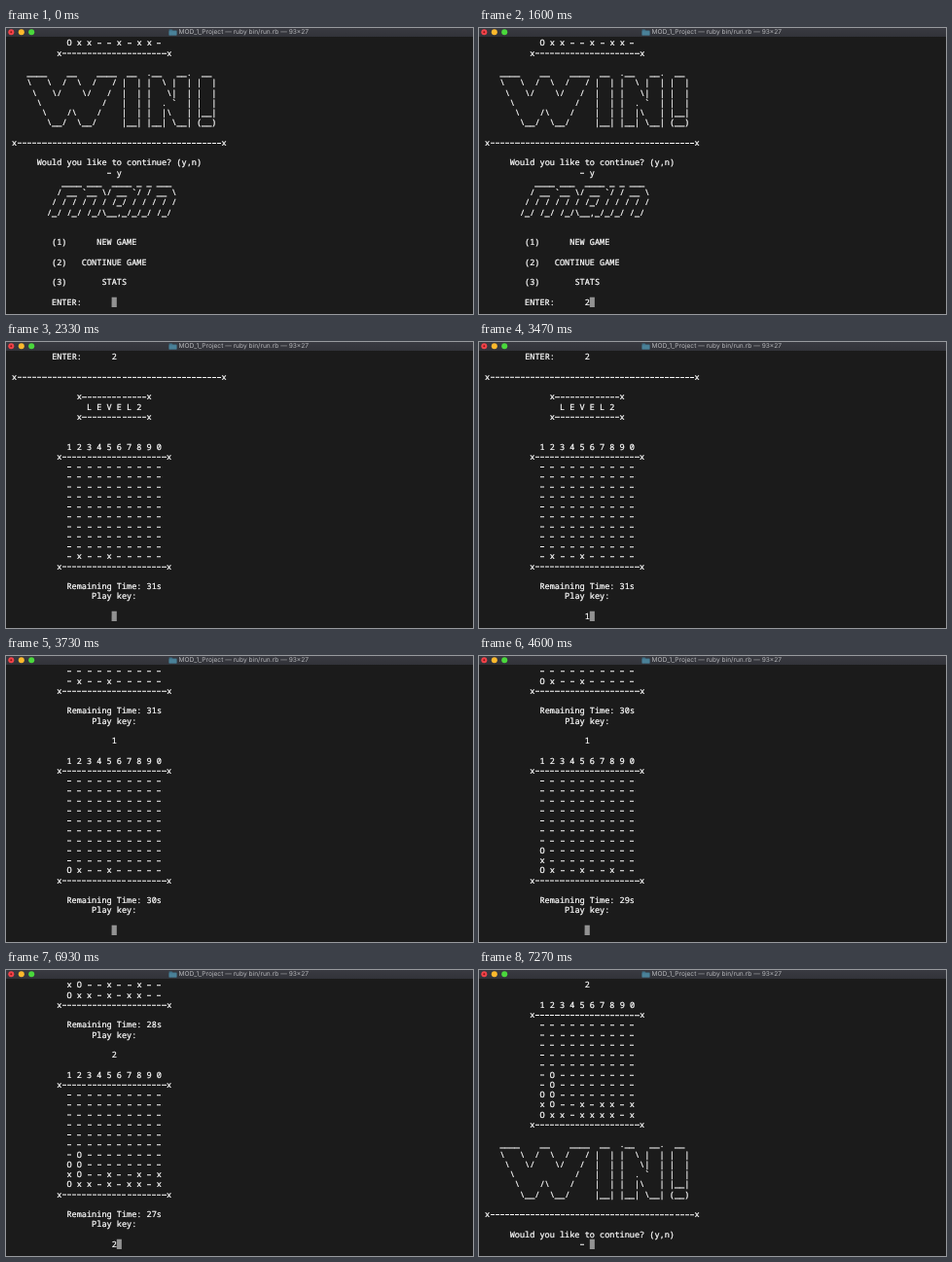
These frames come from a looping animation (480 px wide and 294 px high, 8990 ms). An HTML page:

```html
<!DOCTYPE html>
<html lang="en">
<head>
<meta charset="utf-8">
<title>Terminal game</title>
<style>
  :root { --cw: 51.3px; --rh: 102.5px; }
  html, body { margin: 0; width: 100%; height: 100%; overflow: hidden; background: #1b1b1b; }
  #stage { position: relative; width: 480px; height: 294px; overflow: hidden; background: #1b1b1b; }
  #bar { position: absolute; inset: 0 0 auto; height: 9px; background: linear-gradient(#393a41, #323339); }
  #bar svg { position: absolute; left: 0; top: 0; }
  #bar span {
    position: absolute; left: 177.6px; top: 0; white-space: nowrap; color: #b4b5b8;
    font: 6.62px/9px Inter, Roboto, sans-serif; text-rendering: geometricPrecision;
  }
  /* Laid out ten times larger, so cells keep fractional sizes;
     the slight turn stops baselines snapping to whole pixels */
  #term {
    position: absolute; left: 0; top: 0; width: 4800px; height: 2940px;
    transform-origin: 0 0; transform: scale(.1) rotate(.02deg);
  }
  #screen {
    position: absolute; left: 10px; top: 101px; margin: 0; color: #fff;
    font: 500 85.5px/var(--rh) "Noto Sans Mono", "DejaVu Sans Mono", monospace;
    letter-spacing: calc(var(--cw) - 1ch);
    font-variant-ligatures: none; text-rendering: geometricPrecision;
    -webkit-text-stroke: 2.5px #fff;
  }
  /* wide hyphens, one dash per cell */
  #screen i {
    font-style: normal; color: transparent; -webkit-text-stroke: 0;
    background: repeating-linear-gradient(90deg, transparent 0 5px, #fff 5px 46px, transparent 46px 51.3px)
      0 59px / 100% 10px no-repeat;
  }
  #cursor {
    position: absolute; top: 2766px; width: var(--cw); height: var(--rh); background: #929292;
  }
</style>
</head>
<body>
<div id="stage">
  <div id="term">
    <div id="cursor"></div>
    <pre id="screen"></pre>
  </div>
  <div id="bar">
    <svg width="480" height="9">
      <circle cx="5.3" cy="4.3" r="3" fill="#f2434a"/>
      <circle cx="5.3" cy="4.3" r="1" fill="#8a1512"/>
      <circle cx="15.8" cy="4.3" r="3" fill="#fdb92c"/>
      <circle cx="26.2" cy="4.3" r="3" fill="#4ad83c"/>
      <path d="M167.6 1.6h3l.8.8h4v5h-7.8z" fill="#3f7288"/>
      <path d="M167.6 3.2h7.8v4.2h-7.8z" fill="#4a8198"/>
    </svg>
    <span>MOD_1_Project — ruby bin/run.rb — 93×27</span>
  </div>
</div>

<script type="text/plain" id="win">
____    __    ____  __  .__   __.  __
\   \  /  \  /   / |  | |  \ |  | |  |
 \   \/    \/   /  |  | |   \|  | |  |
  \            /   |  | |  . `  | |  |
   \    /\    /    |  | |  |\   | |__|
    \__/  \__/     |__| |__| \__| (__)
</script>
<script type="text/plain" id="main">
   ____ ___  ____ _ _ ___
  / __ `__ \/ __ `/ / __ \
 / / / / / / /_/ / / / / /
/_/ /_/ /_/\__,_/_/_/ /_/
</script>

<script>
const LOOP = 8990, ROWS = 27;
const log = [], shots = [];
const view = document.getElementById('screen');
const cursor = document.getElementById('cursor');

const print = (col, ...rows) =>
  rows.forEach(r => log.push(r ? ' '.repeat(col) + r : ''));
const art = id => document.getElementById(id).textContent.split('\n').slice(1, -1);
const rule = n => 'x' + '-'.repeat(n) + 'x';

// The cursor always sits at the end of the last line
function snap(t) {
  const lines = log.slice(-ROWS);
  shots.push({
    t,
    html: lines.join('\n').replace(/-+/g, '<i>$&</i>'),
    x: 10 + 51.3 * lines[lines.length - 1].length
  });
}

function type(t, key) {
  log[log.length - 1] += key;
  snap(t);
}

function printWin() {
  print(0, '');
  print(4, ...art('win'));
  print(1, '', rule(41), '');
  print(6, 'Would you like to continue? (y,n)');
  print(20, '- ');
}

// Ten columns of stacked marks, bottom first
const stacks = Array(10).fill('');
const drop = (mark, ...cols) => cols.forEach(c => stacks[c - 1] += mark);

function printBoard() {
  print(12, '', '1 2 3 4 5 6 7 8 9 0');
  print(10, rule(21));
  for (let y = 9; y >= 0; y--) print(12, stacks.map(s => s[y] || '-').join(' '));
  print(10, rule(21));
}

function round(t, seconds) {
  printBoard();
  print(12, '', `Remaining Time: ${seconds}s`);
  print(17, 'Play key:', '', '    ');
  snap(t);
}

// Menu
print(12, 'O x x - - x - x x -');
print(10, rule(21));
printWin();
log[log.length - 1] += 'y';
print(8, ...art('main'), '', '');
print(9, '(1)      NEW GAME', '', '(2)   CONTINUE GAME', '', '(3)       STATS', '', 'ENTER:      ');
snap(0);
type(1600, '2');
print(0, '');
snap(2200);

// Level
print(1, rule(41), '');
print(14, rule(13), '  L E V E L 2', rule(13), '');
drop('x', 2, 5);
round(2330, 31);

const turns = [
  // typed, shown, seconds, key, enemy columns
  [3470, 3730, 30, 1, []],
  [4330, 4600, 29, 1, [1, 8]],
  [5270, 5400, 28, 2, [3, 7]],
  [5800, 6070, 28, 2, [5, 8]],
  [6400, 6600, 27, 2, [10, 10]],
  [6930, 7200, 0, 2, [6, 7]]
];
for (const [typed, shown, seconds, key, enemy] of turns) {
  type(typed, key);
  drop('x', ...enemy);
  drop('O', key);
  if (seconds) round(shown, seconds);
  else {
    printBoard();
    printWin();
    snap(shown);
  }
}

let current;
function frame() {
  const t = performance.now() % LOOP;
  const shot = shots.filter(s => s.t <= t).pop();
  if (shot !== current) {
    current = shot;
    view.innerHTML = shot.html;
    cursor.style.left = shot.x + 'px';
  }
  requestAnimationFrame(frame);
}
frame();
</script>
</body>
</html>
```
